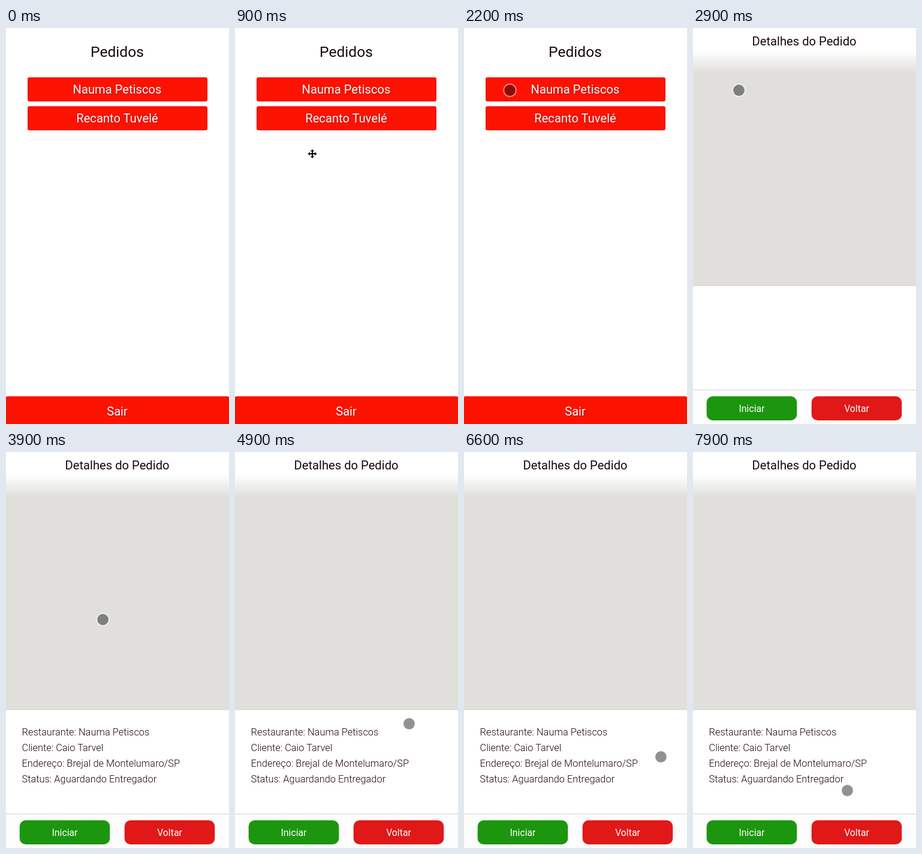
Write an HTML page that moves like this. It is 372 px wide and 658 px high and loops after 8000 ms.

```html
<!DOCTYPE html>
<html lang="pt-BR">
<head>
<meta charset="utf-8">
<title>Pedidos</title>
<style>
  html, body { margin: 0; width: 100%; height: 100%; overflow: hidden; background: #fff; }
  svg { display: block; width: 100vw; height: 100vh; }
  text { font-family: Roboto, "Open Sans", sans-serif; font-size: 20.2px; fill: #1a080c; }
  .mid { text-anchor: middle; }
  .head { font-size: 24.6px; }
  .light { fill: #fff; }
  .shade { text-shadow: 1px 1px 1px rgba(70, 0, 0, .35); }
  .small { font-size: 15.8px; }
  .info { font-size: 16.4px; font-weight: 300; fill: #22060e; }
</style>
</head>
<body>
<svg viewBox="0 0 372 658">
  <defs>
    <linearGradient id="fade" x1="0" y1="0" x2="0" y2="1">
      <stop offset="0" stop-color="#fff"/>
      <stop offset="1" stop-color="#fff" stop-opacity="0"/>
    </linearGradient>
  </defs>

  <g id="orders">
    <text class="mid head" x="185.5" y="48">Pedidos</text>
    <g fill="#fc1200">
      <rect x="36" y="82" width="300" height="40" rx="3"/>
      <rect x="36" y="130" width="300" height="40" rx="3"/>
      <rect y="612" width="372" height="50" rx="2"/>
    </g>
    <text class="mid light shade" x="185.5" y="109">Nauma Petiscos</text>
    <text class="mid light shade" x="185.5" y="157">Recanto Tuvelé</text>
    <text class="mid light shade" x="185.5" y="644">Sair</text>
  </g>

  <g id="details">
    <rect y="37" width="372" height="392" fill="#e0dfdb"/>
    <rect y="37" width="372" height="38" fill="url(#fade)"/>
    <text class="mid" x="185.5" y="29">Detalhes do Pedido</text>
    <g id="info"></g>
    <rect y="601" width="372" height="57" fill="#fdfdfd"/>
    <rect y="601" width="372" height="1" fill="#d4d4d4"/>
    <rect x="22.7" y="612" width="150.6" height="40" rx="10" fill="#1c960f"/>
    <rect x="197.7" y="612" width="150.6" height="40" rx="10" fill="#e01818"/>
    <text class="mid light small" x="98" y="638">Iniciar</text>
    <text class="mid light small" x="273" y="638">Voltar</text>
  </g>

  <path id="move" stroke="#fff" paint-order="stroke"
    d="M0-7.5l3 3.5h-2v3h3v-2l3.5 3-3.5 3v-2h-3v3h2l-3 3.5-3-3.5h2v-3h-3v2l-3.5-3 3.5-3v2h3v-3h-2z"/>
  <g id="touch">
    <circle r="9.5" fill-opacity=".43"/>
    <circle r="10.3" fill="none" stroke="#fff" stroke-opacity=".5" stroke-width="1.8"/>
  </g>
</svg>
<script>
  const LOOP = 8000, TICK = 100, GLIDE = 600;
  const ENTER = 500, TOUCH = 1300, OPEN = 2900, LOADED = 3100;

  const lines = [
    "Restaurante: Nauma Petiscos",
    "Cliente: Caio Tarvel",
    "Endereço: Brejal de Montelumaro/SP",
    "Status: Aguardando Entregador"
  ];

  // Places the pointer comes to rest: arrival time, x, y
  const stops = [
    [500, 329, 43], [800, 86, 241], [900, 129, 209], [1100, 105, 209],
    [1800, 15, 97], [2200, 76.5, 103.5], [4100, 268, 497], [4500, 240, 450],
    [4900, 290.5, 451.5], [5100, 190.5, 498], [5600, 231.5, 482.5], [6000, 320, 514],
    [6300, 237.5, 523.5], [6600, 328.5, 506.5], [7100, 271.5, 549.5], [7500, 321.5, 544.5],
    [7900, 257.5, 562.5]
  ];

  const el = id => document.getElementById(id);
  const [orders, details, info, move, touch] = ["orders", "details", "info", "move", "touch"].map(el);
  const show = (node, on) => node.setAttribute("visibility", on ? "inherit" : "hidden");

  info.innerHTML = lines
    .map((line, i) => `<text class="info" x="26.5" y="${471 + 26 * i}">${line}</text>`)
    .join("");

  // The pointer rests at a stop, then speeds up towards the next one.
  function pointAt(t) {
    const next = Math.max(1, stops.findIndex(s => s[0] >= t));
    const [from, x0, y0] = stops[next - 1];
    const [to, x1, y1] = stops[next];
    const begin = Math.max(from, to - GLIDE);
    const k = Math.max(0, (t - begin) / (to - begin)) ** 2;
    return [x0 + (x1 - x0) * k, y0 + (y1 - y0) * k];
  }

  function draw(ms) {
    const t = Math.floor((ms % LOOP) / TICK) * TICK;
    const at = `translate(${pointAt(t).join(" ")})`;
    show(orders, t < OPEN);
    show(details, t >= OPEN);
    show(info, t >= LOADED);
    show(move, t >= ENTER && t < TOUCH);
    show(touch, t >= TOUCH);
    move.setAttribute("transform", at);
    touch.setAttribute("transform", at);
  }

  const start = performance.now();
  function frame() {
    draw(performance.now() - start);
    requestAnimationFrame(frame);
  }
  frame();
</script>
</body>
</html>
```
